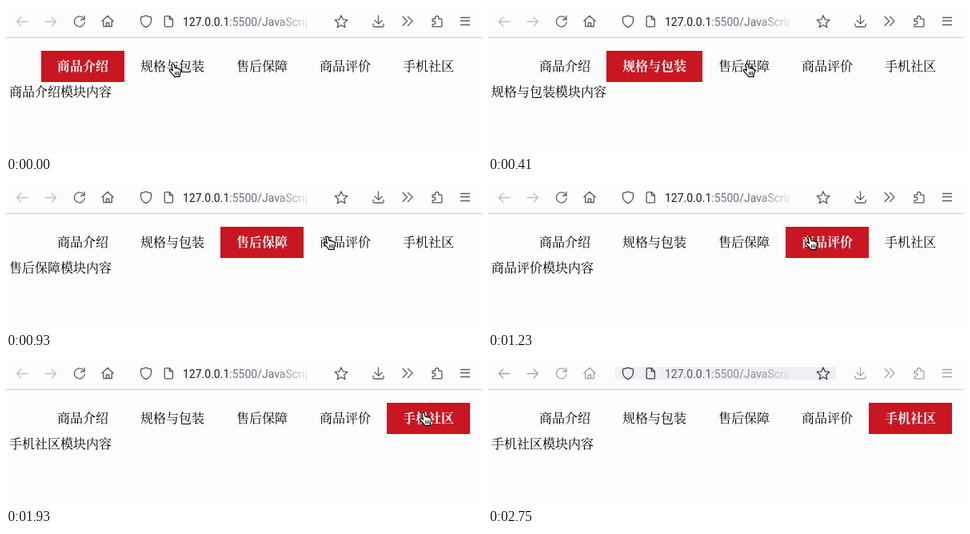
An HTML page with a canvas that plays this animation: 595x185 px, repeating every 2.85 s.

```html
<!DOCTYPE html>
<html lang="zh-CN">
<head>
<meta charset="utf-8">
<title>Tabs</title>
<style>
html, body { margin: 0; width: 100%; height: 100%; overflow: hidden; background: #fdfdfd; }
canvas { display: block; }
</style>
</head>
<body>
<canvas id="stage" width="595" height="185"></canvas>
<script>
const ctx = document.getElementById('stage').getContext('2d');
const LOOP = 2850;
const PAPER = '#fdfdfd';
const CJK = '"Noto Serif CJK SC", "Noto Sans CJK SC", "Noto Sans CJK", serif';
const TABS = ['商品介绍', '规格与包装', '售后保障', '商品评价', '手机社区'];
const CLICKS = [60, 650, 1230, 1930];

// Pointer moves; lead = 1 when the first step already leaves the start point
const MOVES = [
  { start: 60, end: 410, steps: 6, lead: 0, from: [203, 71], to: [318, 71] },
  { start: 650, end: 930, steps: 6, lead: 0, from: [318, 71], to: [396, 67] },
  { start: 1230, end: 1690, steps: 9, lead: 0, from: [396, 67], to: [516, 67] },
  { start: 2110, end: 2400, steps: 6, lead: 1, from: [516, 67], to: [539, 188] }
];

const ICONS = {
  back: 'M27 19.5H13.5M19 14L13.5 19.5L19 25',
  forward: 'M49 19.5H62.5M57 14L62.5 19.5L57 25',
  reload: 'M97 15.3A6.5 6.5 0 1 0 98.3 20.5M98 12.5V17H93.5',
  home: 'M119.8 19L127 12.3L134.2 19M121.7 17.7V25.5H132.3V17.7M125.3 25.5V21H128.7V25.5',
  shield: 'M175 12.2L181.5 14.2V18Q181.2 24 175 26.6Q168.8 24 168.5 18V14.2Z',
  page: 'M199.5 12.7H204.5L208.4 16.6V24.5Q208.4 25.8 207 25.8H199.5Q198.2 25.8 198.2 24.5V14Q198.2 12.7 199.5 12.7ZM204.3 12.7V16.8H208.4',
  download: 'M465.5 12V22M461 18L465.5 22.4L470 18M459 22.5V24.5Q459 26 460.5 26H470.5Q472 26 472 24.5V22.5',
  more: 'M496 13.5L501.5 19L496 24.5M502.5 13.5L508 19L502.5 24.5',
  puzzle: 'M533 16.2H536.5V14.5Q536.7 12.5 538.7 12.5Q540.7 12.5 540.8 14.5V16.2H544.8V25.8H533V22.8H535Q537 22.6 537 20.9Q537 19.2 535 19H533Z',
  menu: 'M568.5 14.5H579.5M568.5 18.5H579.5M568.5 23.5H579.5'
};

const HAND = new Path2D('M4 2.7Q4.4 .8 6 1.2Q7 1.6 7.3 3L8.2 6.7Q9.7 5.6 10.7 7.1Q12.2 6.2 13.1 7.8Q15 7.3 15.4 9.3Q15.7 12 14.4 14.2L14 17.3H7.5Q6.6 15.4 4.6 13.6Q2.2 11.4 1.4 9.7Q1.4 8.1 3.1 8.3L5.4 10Z');
const KNUCKLES = new Path2D('M8.6 11.5V15M10.6 11.3V15M12.6 11.2V15');

function star(cx, cy, outer, inner) {
  const path = new Path2D();
  for (let i = 0; i < 10; i++) {
    const r = i % 2 ? inner : outer;
    const a = i * Math.PI / 5 - Math.PI / 2;
    path.lineTo(cx + r * Math.cos(a), cy + r * Math.sin(a));
  }
  path.closePath();
  return path;
}

for (const name in ICONS) ICONS[name] = new Path2D(ICONS[name]);
ICONS.star = star(419, 20, 8.2, 3.8);

function rect(color, x, y, w, h) {
  ctx.fillStyle = color;
  ctx.fillRect(x, y, w, h);
}

function text(str, x, y, color, font) {
  ctx.font = font;
  ctx.fillStyle = color;
  ctx.fillText(str, x, y);
}

function strokeIcons(names, color) {
  ctx.strokeStyle = color;
  ctx.lineWidth = 1.3;
  for (const name of names) ctx.stroke(ICONS[name]);
}

function drawAddress(idle) {
  const font = '14px Roboto, Inter, sans-serif';
  const host = '127.0.0.1';
  ctx.save();
  ctx.beginPath();
  ctx.rect(215, 8, 163, 24);
  ctx.clip();
  text(host, 221, 25, idle ? '#55555c' : '#1d1c28', font);
  const fade = ctx.createLinearGradient(338, 0, 384, 0);
  const rgb = idle ? '139,139,146' : '112,112,124';
  fade.addColorStop(0, `rgb(${rgb})`);
  fade.addColorStop(1, `rgba(${rgb},0)`);
  text(':5500/JavaScript', 221 + ctx.measureText(host).width, 25, fade, font);
  ctx.restore();
}

function drawToolbar(idle) {
  rect('#cdcdd0', 0, 39, 595, 1);
  if (idle) rect('#f0f0f4', 159, 11, 276, 16);
  strokeIcons(['back', 'forward'], idle ? '#a3a3a9' : '#c0c0c5');
  strokeIcons(['reload', 'home', 'download', 'more', 'puzzle', 'menu'], idle ? '#a3a3a9' : '#5b5b66');
  strokeIcons(['shield', 'page', 'star'], idle ? '#3f3f48' : '#55555f');
  drawAddress(idle);
}

function drawTabs(active) {
  let x = 44;
  TABS.forEach((label, i) => {
    const width = label.length * 16 + 40;
    const on = i === active;
    if (on) rect('#c81623', x, 56, width, 39);
    text(label, x + 20, 81, on ? '#fff' : '#000', `${on ? 700 : 500} 16px ${CJK}`);
    x += width;
  });
  text(TABS[active] + '模块内容', 4, 113, '#000', `500 16px ${CJK}`);
}

function pointerAt(t) {
  let pos = MOVES[0].from;
  for (const m of MOVES) {
    if (t < m.start) break;
    const gap = (m.end - m.start) / (m.steps - 1);
    const step = Math.min(m.steps - 1, Math.floor((t - m.start) / gap + 0.05));
    const p = (step + m.lead) / (m.steps - 1 + m.lead);
    pos = m.from.map((v, i) => v + (m.to[i] - v) * p);
  }
  return pos;
}

function drawPointer([x, y]) {
  ctx.save();
  ctx.translate(Math.floor(x), Math.floor(y));
  ctx.fillStyle = '#fff';
  ctx.strokeStyle = '#000';
  ctx.lineWidth = 1.2;
  ctx.fill(HAND);
  ctx.stroke(HAND);
  ctx.lineWidth = 0.9;
  ctx.stroke(KNUCKLES);
  ctx.restore();
}

function draw(t) {
  rect(PAPER, 0, 0, 595, 185);
  drawToolbar(t >= 2750);
  drawTabs(CLICKS.filter(c => t >= c).length);
  if (t < 2400) drawPointer(pointerAt(t));
}

ctx.lineCap = ctx.lineJoin = 'round';
const origin = performance.now();
function tick() {
  draw((performance.now() - origin) % LOOP);
  requestAnimationFrame(tick);
}
tick();
</script>
</body>
</html>
```
